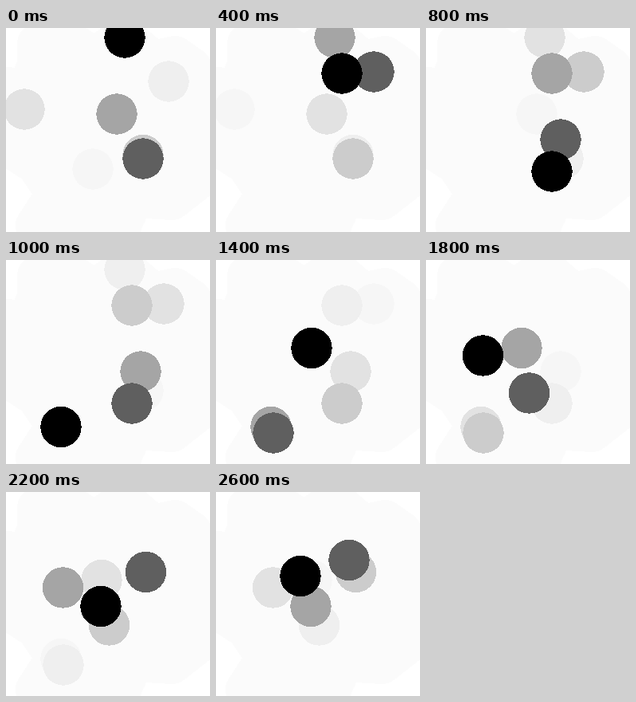
These frames come from a looping animation (256 px wide and 256 px high, 2.8 s). An HTML page:

```html
<!DOCTYPE html>
<html>
<head>
<meta charset="utf-8">
<style>
html, body { margin: 0; height: 100%; overflow: hidden; background: #fff; }
svg { display: block; width: 100vmin; height: 100vmin; shape-rendering: crispEdges; }
path { fill: #fbfbfb; stroke: #fbfbfb; stroke-width: 52; stroke-linejoin: round; }
</style>
</head>
<body>
<svg id="stage" viewBox="0 0 256 256">
  <!-- Faint stain of long-faded dots, a thick outline through their centres -->
  <path d="M40 20L75 14L110 38L149 12L184 42L212 36L232 50L240 190L208 215L160 212L137 262L88 230L38 248L64 208L38 170L-6 142V74L28 78L40 46Z"/>
</svg>
<script>
const STEP = 200, LOOP = 2800, LIFE = 7;
const FADE = 0.565, CONTRAST = 283;

// Landing places, one per step; the first ones are already fading at time zero.
const places = '109,177 204,67 23,102 172,159.5 139,108 172,164 ' +
  '149,12 198,55 158,57 169,140 158,180 69,209.5 72,217 ' +
  '120,110.5 129.5,167 71.5,120 175.5,100.5 119,143.5 167,85.5 106,105.5';

const stage = document.getElementById('stage');

function addDot(place) {
  const [x, y] = place.split(',');
  const dot = document.createElementNS(stage.namespaceURI, 'circle');
  dot.setAttribute('cx', x);
  dot.setAttribute('cy', y);
  dot.setAttribute('r', 25.7);
  return stage.appendChild(dot);
}

const dots = places.split(' ').map(addDot);
const lead = dots.length - LOOP / STEP;

// Each dot lands black, then decays exponentially towards white.
function draw(time) {
  const newest = lead + Math.floor(time % LOOP / STEP);
  dots.forEach((dot, i) => {
    const age = newest - i;
    const level = Math.max(0, Math.round(255 - CONTRAST * FADE ** age));
    const visible = age >= 0 && age < LIFE;
    dot.setAttribute('fill', visible ? `rgb(${level},${level},${level})` : 'none');
  });
}

const start = performance.now();
function tick() {
  draw(performance.now() - start);
  requestAnimationFrame(tick);
}
tick();
</script>
</body>
</html>
```
